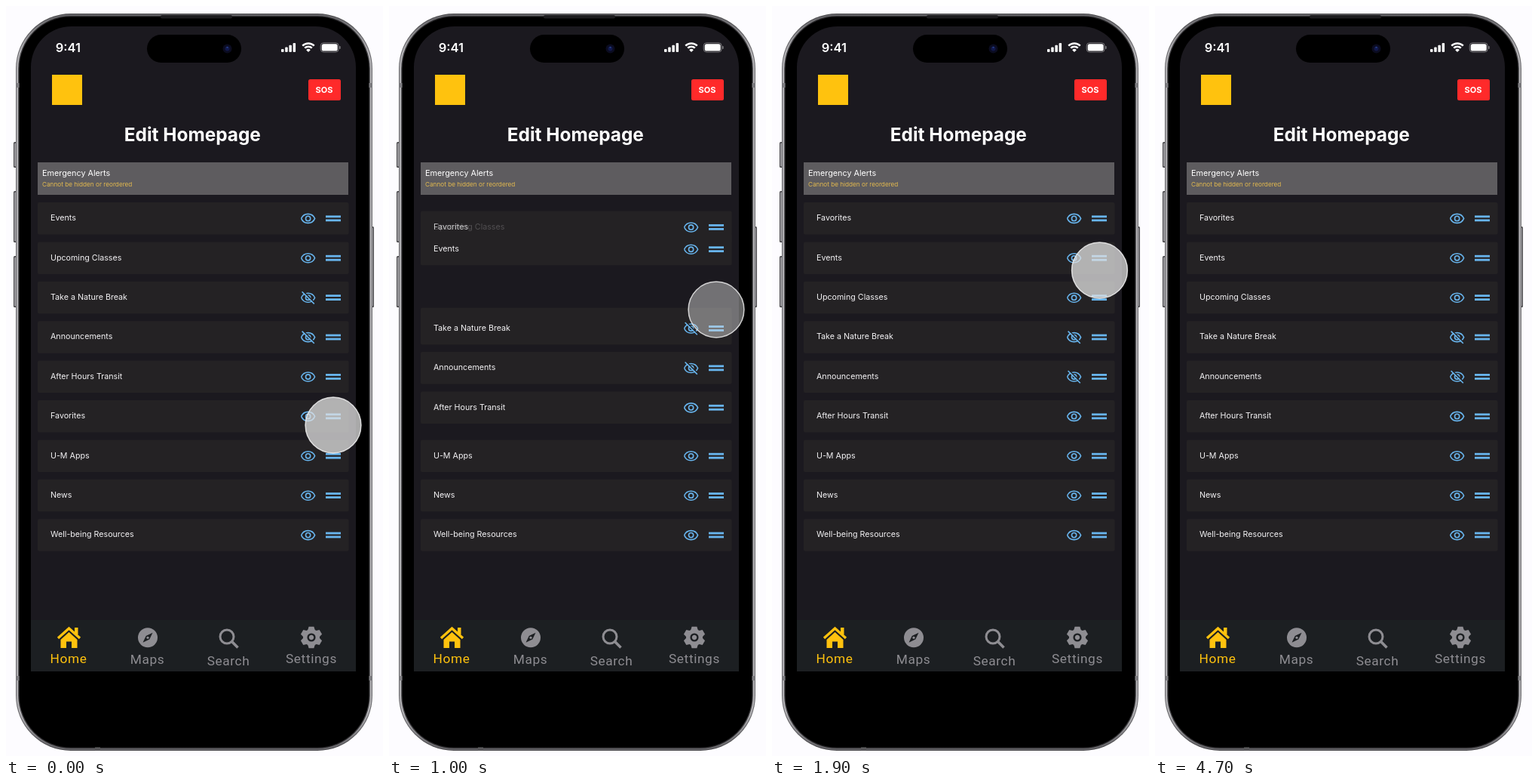
An HTML page with a canvas that plays this animation: 500 by 993 pixels, repeating every 4.8 s.

```html
<!DOCTYPE html>
<html lang="en">
<head>
<meta charset="utf-8">
<title>Edit Homepage</title>
<style>
html, body { margin: 0; width: 100%; height: 100%; overflow: hidden; background: #fdfcff; }
canvas { display: block; width: 500px; height: 993px; }
</style>
</head>
<body>
<canvas id="stage"></canvas>
<script>
const W = 500, H = 993, LOOP = 4800, STEP = 100;
const BG = '#1b191f', BAR = '#1c1f22', ROW = '#242224';
const BLUE = '#68b5ee', GOLD = '#ffc20e', GRAY = '#8e8d92';
const INTER = 'Inter, sans-serif', ROBOTO = 'Roboto, sans-serif';

const canvas = document.getElementById('stage');
const ctx = canvas.getContext('2d');
const dpr = window.devicePixelRatio || 1;
canvas.width = W * dpr;
canvas.height = H * dpr;

const clamp = v => Math.max(0, Math.min(1, v));
const mix = (a, b, p) => a + (b - a) * p;
const easeOut = t => 1 - Math.pow(1 - t, 1.65);

function box(x, y, w, h, r, color) {
  ctx.fillStyle = color;
  ctx.beginPath();
  ctx.roundRect(x, y, w, h, r);
  ctx.fill();
}

function disc(x, y, r, color) {
  ctx.fillStyle = color;
  ctx.beginPath();
  ctx.arc(x, y, r, 0, Math.PI * 2);
  ctx.fill();
}

function ring(x, y, r, width, color) {
  ctx.strokeStyle = color;
  ctx.lineWidth = width;
  ctx.beginPath();
  ctx.arc(x, y, r, 0, Math.PI * 2);
  ctx.stroke();
}

function line(points, width, color) {
  ctx.strokeStyle = color;
  ctx.lineWidth = width;
  ctx.beginPath();
  points.forEach(([x, y]) => ctx.lineTo(x, y));
  ctx.stroke();
}

function poly(points, color) {
  ctx.fillStyle = color;
  ctx.beginPath();
  points.forEach(([x, y]) => ctx.lineTo(x, y));
  ctx.fill();
}

function text(str, x, y, font, color, align = 'left', spacing = 0) {
  ctx.font = font;
  ctx.fillStyle = color;
  ctx.textAlign = align;
  ctx.letterSpacing = spacing + 'px';
  ctx.fillText(str, x, y);
  ctx.letterSpacing = '0px';
}

// Phone body

// Metal rim: darker at the top and bottom edges.
function metal(edge, side) {
  const g = ctx.createLinearGradient(0, 10, 0, 986);
  g.addColorStop(0, edge);
  g.addColorStop(0.05, side);
  g.addColorStop(0.95, side);
  g.addColorStop(1, edge);
  return g;
}

function drawPhone() {
  const button = (x, y, w, h) => {
    box(x, y, w, h, 1.5, '#454447');
    box(x + 1, y + 1.5, w - 2, h - 3, 1, '#9d9ca0');
  };
  button(10, 180, 5, 34);
  button(10, 245, 5, 68);
  button(10, 331, 5, 68);
  button(484, 292, 4, 107);

  const shell = [
    [0, metal('#4a494c', '#6d6c70')],
    [1.1, metal('#605f63', '#b4b3b6')],
    [3.2, metal('#1c1b1d', '#434245')],
    [4.5, '#000']
  ];
  for (const [d, color] of shell) {
    box(13 + d, 10 + d, 473 - 2 * d, 976 - 2 * d, 73 - d, color);
  }
  for (const y of [102, 887]) {
    box(13.5, y, 4, 6, 0, '#7d7c80');
    box(481.5, y, 4, 6, 0, '#7d7c80');
  }
  box(205, 12, 95, 4.5, 2, '#1d1c1f');
  box(118, 981.5, 7, 4, 0, '#59585b');

  ctx.save();
  ctx.beginPath();
  ctx.rect(33, 20, 431, 861);
  ctx.clip();
  box(33, 27, 431, 900, 54, BG);
  box(33, 813, 431, 68, 0, BAR);
  ctx.restore();

  box(187, 38, 125, 37, 18.5, '#000');
  disc(293.5, 56.5, 6, '#0b0c20');
  disc(293.5, 56.5, 3, '#11184a');
  disc(293.5, 54.8, 1.1, '#27408c');
}

function drawStatus() {
  text('9:41', 65.8, 60.7, '600 16.5px ' + INTER, '#fff');
  [4, 6.5, 9.3, 12].forEach((h, i) => box(365 + i * 5.2, 61 - h, 3.5, h, 1, '#fff'));
  const a = Math.PI * 1.25, b = Math.PI * 1.75;
  for (const r of [11, 6.8]) {
    ctx.strokeStyle = '#fff';
    ctx.lineWidth = 2.4;
    ctx.beginPath();
    ctx.arc(401, 60.5, r, a, b);
    ctx.stroke();
  }
  ctx.fillStyle = '#fff';
  ctx.beginPath();
  ctx.moveTo(401, 61);
  ctx.arc(401, 61, 4, a, b);
  ctx.fill();
  ctx.strokeStyle = 'rgba(255,255,255,.4)';
  ctx.lineWidth = 1;
  ctx.beginPath();
  ctx.roundRect(417.2, 48.8, 24, 12.2, 4);
  ctx.stroke();
  box(418.7, 50.3, 21, 9.2, 2.6, '#fff');
  box(442.3, 53, 1.3, 4, 1, 'rgba(255,255,255,.5)');
}

function drawHeader() {
  box(61, 91, 40, 40, 0, GOLD);
  box(401, 97, 43, 28, 2.5, '#ff2a2a');
  text('SOS', 422, 115, '700 11px ' + INTER, '#fff', 'center');
  text('Edit Homepage', 247.3, 179, '700 24.4px ' + INTER, '#fff', 'center');
  box(42, 207, 412, 43, 0, '#5e5c5f');
  text('Emergency Alerts', 48, 224.8, '400 10.8px ' + INTER, '#fff');
  text('Cannot be hidden or reordered', 48, 239, '400 8.2px ' + INTER, '#e2b94f');
}

// Navigation

function drawHome() {
  box(91, 823, 4.5, 9, 0, GOLD);
  line([[69, 837], [83.5, 824], [98, 837]], 3.4, GOLD);
  poly([[72.5, 839], [83.5, 829], [94.5, 839], [94.5, 850], [87, 850],
    [87, 841.5], [80, 841.5], [80, 850], [72.5, 850]], GOLD);
}

function drawCompass() {
  disc(188, 836.3, 13, GRAY);
  poly([[194.5, 829.8], [190.3, 838.6], [181.5, 842.8], [185.7, 834]], BAR);
  disc(188, 836.3, 1.6, GRAY);
}

function drawSearch() {
  ring(293, 835, 9, 3, GRAY);
  line([[299.3, 841.3], [307.5, 849.5]], 3.6, GRAY);
}

function drawGear() {
  ctx.save();
  ctx.translate(405, 836);
  for (let i = 0; i < 6; i++) {
    poly([[-5, -9], [-3.4, -14.3], [3.4, -14.3], [5, -9]], GRAY);
    ctx.rotate(Math.PI / 3);
  }
  disc(0, 0, 11, GRAY);
  ring(0, 0, 4.4, 2.4, BAR);
  ctx.restore();
}

function drawNav() {
  drawHome();
  drawCompass();
  drawSearch();
  drawGear();
  const label = (str, x, y, color) => text(str, x, y, '400 17.3px ' + ROBOTO, color, 'left', 0.6);
  label('Home', 58.6, 870, GOLD);
  label('Maps', 164.7, 871, GRAY);
  label('Search', 266.7, 872.5, GRAY);
  label('Settings', 371, 870.3, GRAY);
}

// List

function drawEye(y, hidden) {
  const x = 400.6;
  ctx.strokeStyle = BLUE;
  ctx.lineWidth = 1.6;
  ctx.beginPath();
  ctx.moveTo(x - 9, y);
  ctx.bezierCurveTo(x - 5.5, y - 8, x + 5.5, y - 8, x + 9, y);
  ctx.bezierCurveTo(x + 5.5, y + 8, x - 5.5, y + 8, x - 9, y);
  ctx.stroke();
  ring(x, y, 3.1, 1.6, BLUE);
  if (hidden) {
    line([[x - 6.8, y - 8.8], [x + 9.4, y + 7.4]], 1.6, ROW);
    line([[x - 8, y - 8], [x + 8.2, y + 8.2]], 1.6, BLUE);
  }
}

const slotY = slot => 281 + 52.4 * slot;

function drawRow(slot, labels, hidden) {
  const y = slotY(slot);
  box(42, y - 21, 412.5, 42.5, 2, ROW);
  for (const [str, alpha] of labels) {
    ctx.globalAlpha = alpha;
    text(str, 59, y + 3.1, '400 10.7px ' + INTER, '#f4f3f5');
  }
  ctx.globalAlpha = 1;
  drawEye(y + 0.4, hidden);
  box(424, y - 3.6, 20, 2.8, 0, BLUE);
  box(424, y + 1.4, 20, 2.8, 0, BLUE);
}

// label, first slot, last slot, hidden
const ROWS = [
  ['Events', 0, 1, false],
  ['Take a Nature Break', 2, 3, true],
  ['Announcements', 3, 4, true],
  ['After Hours Transit', 4, 5, false],
  ['U-M Apps', 6, 6, false],
  ['News', 7, 7, false],
  ['Well-being Resources', 8, 8, false]
];

function drawList(t) {
  const p = easeOut(clamp((t - 820) / 300));
  // These two cards trade labels while they slide.
  const [low, high] = ['Upcoming Classes', 'Favorites'];
  drawRow(mix(5, 2, p), [[high, 1 - p], [low, p]], false);
  drawRow(mix(1, 0, p), [[low, 1 - p], [high, p]], false);
  for (const [str, from, to, hidden] of ROWS) {
    drawRow(mix(from, to, p), [[str, 1]], hidden);
  }
}

// Touch pointer: time, x, y
const PATH = [
  [0, 434, 555], [300, 435, 550], [600, 435.5, 547], [700, 435.3, 532],
  [800, 435, 490], [900, 434.4, 440], [1000, 434, 402], [1100, 434, 381],
  [1200, 434, 369], [1300, 434, 363], [1500, 434.3, 357], [1800, 434.5, 350],
  [2500, 434.5, 350], [2900, 545, 350]
];

function drawPointer(t) {
  const i = PATH.findIndex(k => k[0] > t);
  if (i < 0) return;
  const [t0, x0, y0] = PATH[i - 1], [t1, x1, y1] = PATH[i];
  const p = (t - t0) / (t1 - t0);
  const x = mix(x0, x1, p), y = mix(y0, y1, p);
  const pressed = t >= 300 && t < 1600;
  disc(x, y, 37.2, pressed ? 'rgba(220,220,220,.45)' : 'rgba(226,226,226,.75)');
  ring(x, y, 36.9, 1.5, 'rgba(240,240,240,.8)');
}

function draw(t) {
  ctx.setTransform(dpr, 0, 0, dpr, 0, 0);
  ctx.fillStyle = '#fdfcff';
  ctx.fillRect(0, 0, W, H);
  drawPhone();
  drawStatus();
  drawHeader();
  drawList(t);
  drawNav();
  drawPointer(t);
}

const start = performance.now();
function tick() {
  const t = (performance.now() - start) % LOOP;
  draw(Math.floor(t / STEP) * STEP);
  requestAnimationFrame(tick);
}
tick();
</script>
</body>
</html>
```
